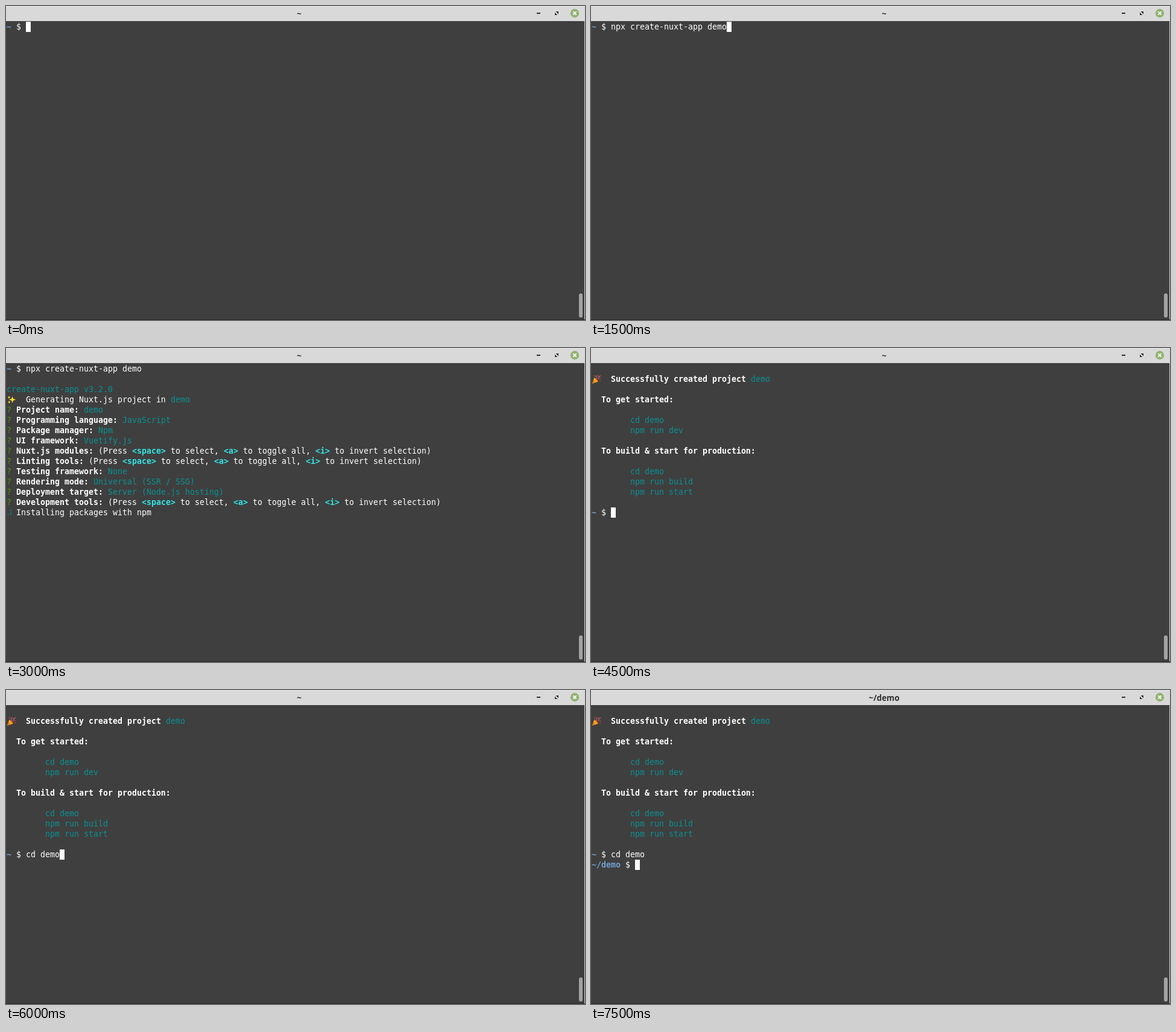
An HTML page with a canvas that plays this animation: 960x520 px, repeating every 8000 ms.

```html
<!DOCTYPE html>
<html lang="en">
<head>
<meta charset="utf-8">
<title>Terminal</title>
<style>
  html, body { margin: 0; width: 100%; height: 100%; overflow: hidden; background: #3f3f3f; }
  canvas { display: block; }
</style>
</head>
<body>
<canvas id="stage" width="960" height="520"></canvas>
<script>
const ctx = document.getElementById('stage').getContext('2d');
const LOOP = 8000, STEP = 1500;
const CELL = 8, LINE = 17, LEFT = 1, TOP = 26, ASCENT = 13;

const MONO = '13.29px "DejaVu Sans Mono", monospace';
const BOLD = 'bold ' + MONO;

// "^" plus a letter switches the text style
const STYLES = {
  w: [MONO, '#ffffff'],
  b: [BOLD, '#ffffff'],
  c: [MONO, '#0b9092'],
  k: [BOLD, '#34e2e2'],
  g: [MONO, '#4e9a06'],
  p: [BOLD, '#729fcf']
};

const HOME = '^p~^w $ ';
const PICK = '^w(Press ^k<space>^w to select, ^k<a>^w to toggle all, ^k<i>^w to invert selection)';
const ask = (label, answer) => `^g? ^b${label}: ${answer}`;
const CREATE = HOME + 'npx create-nuxt-app demo';

const SETUP = [
  CREATE,
  '',
  '^ccreate-nuxt-app v3.2.0',
  '^w    Generating Nuxt.js project in ^cdemo',
  ask('Project name', '^cdemo'),
  ask('Programming language', '^cJavaScript'),
  ask('Package manager', '^cNpm'),
  ask('UI framework', '^cVuetify.js'),
  ask('Nuxt.js modules', PICK),
  ask('Linting tools', PICK),
  ask('Testing framework', '^cNone'),
  ask('Rendering mode', '^cUniversal (SSR / SSG)'),
  ask('Deployment target', '^cServer (Node.js hosting)'),
  ask('Development tools', PICK),
  '^w  Installing packages with npm'
];

const DONE = [
  '',
  '^b    Successfully created project ^cdemo',
  '',
  '^b  To get started:',
  '',
  '^c        cd demo',
  '^c        npm run dev',
  '',
  '^b  To build & start for production:',
  '',
  '^c        cd demo',
  '^c        npm run build',
  '^c        npm run start',
  ''
];

const SCREENS = [
  { lines: [HOME], cursor: true },
  { lines: [CREATE], cursor: true },
  { lines: SETUP, art: () => { sparkles(); spinner(); } },
  { lines: [...DONE, HOME], cursor: true, art: popper },
  { lines: [...DONE, HOME + 'cd demo'], cursor: true, art: popper },
  { lines: [...DONE, HOME + 'cd demo', '^p~/demo^w $ '], cursor: true, art: popper, title: '~/demo' }
];

function rect(color, x, y, w, h) {
  ctx.fillStyle = color;
  ctx.fillRect(x, y, w, h);
}

function disc(color, x, y, r) {
  ctx.fillStyle = color;
  ctx.beginPath();
  ctx.arc(x, y, r, 0, 2 * Math.PI);
  ctx.fill();
}

function poly(color, ...pts) {
  ctx.fillStyle = color;
  ctx.beginPath();
  for (const [x, y] of pts) ctx.lineTo(x, y);
  ctx.fill();
}

function stroke(color, width, path) {
  ctx.strokeStyle = color;
  ctx.lineWidth = width;
  ctx.stroke(new Path2D(path));
}

function star(x, y, r) {
  ctx.fillStyle = '#fcdf30';
  ctx.beginPath();
  for (let i = 0; i < 8; i++) {
    const a = i * Math.PI / 4, d = i % 2 ? r * 0.36 : r;
    ctx.lineTo(x + d * Math.cos(a), y + d * Math.sin(a));
  }
  ctx.fill();
}

function sparkles() {
  star(10.6, 85.5, 5.6);
  star(5, 81.8, 2.8);
  star(5.2, 89.6, 2.8);
}

function spinner() {
  for (const [x, y] of [[3.5, 275.5], [7.8, 268.5], [7.8, 272], [7.8, 275.5]]) {
    disc('#0b9092', x, y, 1);
  }
}

function popper() {
  poly('#f5a31f', [2, 59], [5.6, 48.6], [9, 51], [12.4, 55.4]);
  poly('#d9761c', [2, 59], [4.2, 52.5], [6.4, 57.6]);
  stroke('#6b3a2c', 1.6, 'M6 49 Q10 50 12 55');
  stroke('#d8453c', 1.4, 'M9 51 Q8.4 47 11 44.8');
  stroke('#b5404f', 1.3, 'M11 52.5 Q13 50 16.5 51');
  stroke('#7d6bb0', 1.2, 'M10.5 50 Q14 49.5 14.5 46');
  disc('#d8453c', 5.5, 45.8, 0.9);
  disc('#d8453c', 15.3, 46.2, 1);
  disc('#4f8fc0', 7.6, 47, 0.7);
  disc('#e8a02c', 12.8, 47.2, 0.7);
  disc('#c0453f', 15.3, 54.6, 0.9);
}

function frame(title) {
  rect('#3f3f3f', 0, 0, 960, 520);
  rect('#d9d9d9', 0, 0, 960, 25);
  rect('#e6e6e6', 0, 0, 960, 1);
  rect('#d4d4d4', 959, 0, 1, 520);
  rect('#262626', 0, 519, 960, 1);

  ctx.font = '600 13.33px "Noto Sans", sans-serif';
  ctx.fillStyle = '#303030';
  ctx.textAlign = 'center';
  ctx.fillText(title, 486, 18);
  ctx.textAlign = 'left';

  rect('#303030', 880, 11, 6, 2);
  poly('#303030', [911.5, 9], [916, 9], [916, 13.5]);
  poly('#303030', [910, 10.7], [910, 15], [914.3, 15]);
  disc('#92b372', 943, 12, 7.2);
  stroke('#ffffff', 1.8, 'M940.4 9.4 L945.6 14.6 M945.6 9.4 L940.4 14.6');

  ctx.fillStyle = '#a3a3a3';
  ctx.beginPath();
  ctx.roundRect(950, 476, 6, 40, 3);
  ctx.fill();
}

// Draws one styled line and returns the column after it
function write(line, row) {
  let col = 0;
  for (const run of line.split('^').slice(1)) {
    const text = run.slice(1);
    [ctx.font, ctx.fillStyle] = STYLES[run[0]];
    ctx.fillText(text, LEFT + col * CELL, TOP + ASCENT + row * LINE);
    col += text.length;
  }
  return col;
}

function draw(now) {
  const { lines, cursor, art, title = '~' } = SCREENS[Math.floor(now % LOOP / STEP)];
  frame(title);
  let col = 0;
  lines.forEach((line, row) => { col = write(line, row); });
  if (cursor) rect('#ffffff', LEFT + col * CELL, TOP + (lines.length - 1) * LINE, CELL, LINE);
  if (art) art();
}

let start;
function tick(now) {
  start ??= now;
  draw(now - start);
  requestAnimationFrame(tick);
}
draw(0);
requestAnimationFrame(tick);
</script>
</body>
</html>
```
